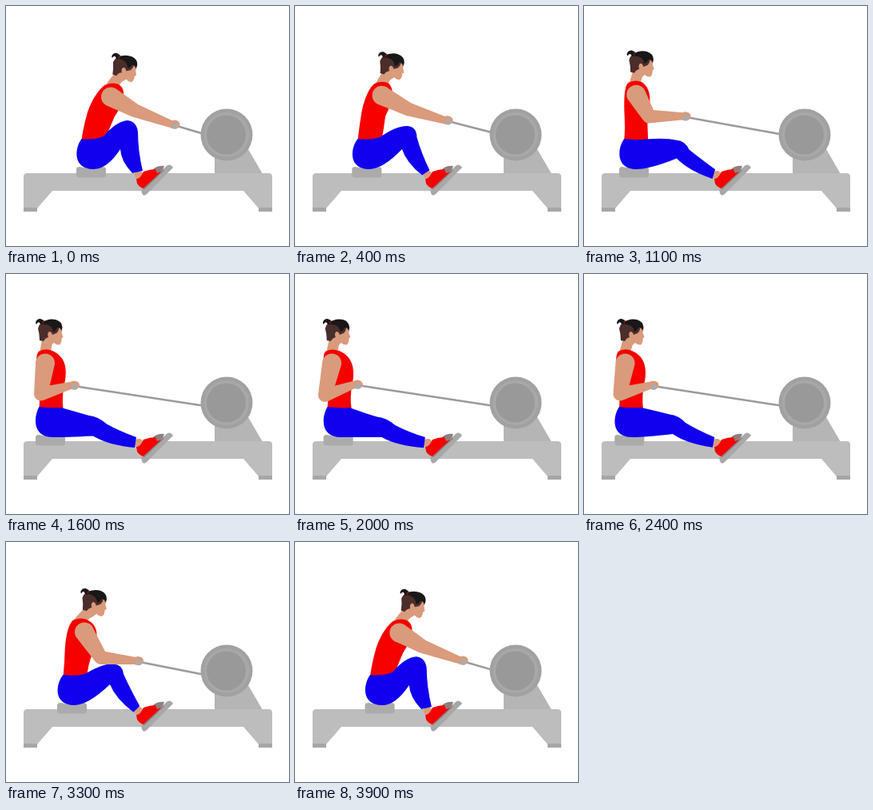
These frames come from a looping animation (354 px wide and 300 px high, 4000 ms). An HTML page:

```html
<!DOCTYPE html>
<html lang="en">
<head>
<meta charset="utf-8">
<title>Rowing machine</title>
<style>
html, body { margin: 0; width: 100%; height: 100%; overflow: hidden; background: #fff; }
svg { display: block; width: 354px; height: 300px; }
</style>
</head>
<body>
<svg viewBox="0 0 354 300" xmlns="http://www.w3.org/2000/svg">
  <path fill="#b5b5b5" d="M261 179H303L321 210H261Z"/>
  <path fill="#bdbdbd" d="M22 253V213Q22 209 27 209H328Q333 209 333 213V253H316L297 231H58L39 253Z"/>
  <path fill="#a6a6a6" d="M22 252H39V257H22ZM316 252H333V257H316Z"/>
  <path id="rope" stroke="#9b9b9b" stroke-width="2.5"/>
  <circle cx="276" cy="161" r="32.5" fill="#a1a1a1"/>
  <circle cx="276" cy="161" r="28" fill="#a8a8a8"/>
  <circle cx="275.5" cy="161" r="24.5" fill="#999"/>

  <path id="seat" fill="#ababab" d="M0 204Q0 201 4 201Q18.500 204 33 201Q37 201 37 204V211Q37 214.500 33 214.500H4Q0 214.500 0 211Z"/>
  <path fill="#a8a8a8" d="M169 229L202 199Q206 197 209 202L176 235Q172 239 170 234Z"/>
  <ellipse cx="166" cy="211" rx="5.500" ry="5" fill="#d99b7c"/>
  <path fill="#8d8080" d="M184 204Q190 199 198 200L196 205L188 210Z"/>
  <path fill="#f60000" d="M163 216Q168 216 172 207Q180 204 187 204L189 209L195 206L190 212L172 228Q167 227 164 222Z"/>
  <path fill="none" stroke="#858585" stroke-width="1.500" d="M172 229L197.500 205"/>

  <path id="neck" stroke="#d99b7c" stroke-width="13.500" stroke-linecap="round"/>
  <path id="vest" fill="#f60000"/>
  <path id="leg" fill="#1000ee"/>
  <g id="head">
    <path fill="#d99b7c" d="M-9 0L13 -8Q15 -3 13.500 1L15.500 7L13.500 8.500Q14 14 11 16.500Q7 17 4 14L-3 20L-12 9Z"/>
    <path fill="#4a2e2b" d="M-16 -4Q-14 -13 -4 -13L11 -8Q10 0 7 2L2 4Q1 0 -2 0Q-5 2 -3 7Q-7 8 -9 12L-14 11Q-14 3 -16 -4Z"/>
    <path fill="#191717" d="M-12 -11Q-3 -17 6 -15Q14 -13 14.500 -5L13.500 -1Q11 -6 8 -5Q6 0 3 0Q2 -6 -3 -8Q-8 -9 -12 -11Z"/>
    <path fill="#191717" d="M-19 -11Q-18 -16 -13 -16Q-9 -15 -7 -12L-9 -9Q-13 -8 -14 -11Q-16 -13 -18 -9Z"/>
    <path stroke="#9c1c1c" stroke-width="1.200" d="M-9 -14L-10 -10"/>
  </g>
  <path id="arm" fill="#d99b7c"/>
  <ellipse id="fist" rx="7" ry="5.500" fill="#d99b7c"/>
  <circle id="grip" r="3.700" fill="#ababab"/>
</svg>
<script>
const LOOP = 4000, STEP = 100;
const times = [0, 700, 1600, 2400, 2800, 3300, 3900];

// One value per key time; the last one, just short of the catch, is derived.
const tracks = {
  seat:   [88, 55, 37, 38.3, 44.5, 64],
  hipX:   [109, 77, 56, 58.5, 65, 86],
  neckX:  [132, 83, 49, 51, 64, 92],
  neckY:  [98, 95, 96, 96, 96, 97],
  chest:  [21, 16, 24, 24, 24, 24],
  headX:  [149, 94.3, 56, 60, 74, 111],
  headY:  [77, 72.5, 72, 72, 72, 75.3],
  tilt:   [10, 3, 0, 0, 0, 6],
  armX:   [131, 85.5, 49, 51.5, 65.5, 98],
  elbowX: [161, 117, 43.5, 45, 63, 118.5],
  elbowY: [130.5, 129.5, 150, 150, 147.5, 144.5],
  handX:  [210.5, 165.5, 85, 86.5, 109, 165],
  handY:  [148, 138.5, 139, 139, 144.5, 148.5],
  ropeY:  [159.5, 157.5, 164.5, 164.5, 166.5, 165.5],
  kneeX:  [152, 129, 104, 107, 117, 135],
  kneeY:  [143, 158, 177, 175.5, 167, 152.5],
  shinX:  [165, 140, 126, 127, 130, 147],
  shinY:  [157, 171, 187.5, 186, 178, 165],
  bendX:  [143, 124.5, 109, 111, 115, 130],
  bendY:  [179, 181, 202.5, 200, 189.5, 178]
};
for (const v of Object.values(tracks)) v.push(v[0] + 0.02 * (v[5] - v[0]));

const count = times.length;
const keyTime = i => times[(i + count) % count] + LOOP * Math.floor(i / count);

// Cyclic cubic through the keys, slopes weighted by interval length.
function sample(v, t) {
  const val = i => v[(i + count) % count];
  const gap = i => keyTime(i + 1) - keyTime(i);
  const rate = i => (val(i + 1) - val(i)) / gap(i);
  const slope = i => (gap(i) * rate(i - 1) + gap(i - 1) * rate(i)) / (gap(i - 1) + gap(i));
  let i = count - 1;
  while (t < times[i]) i--;
  const h = gap(i), u = (t - times[i]) / h, w = 1 - u;
  return val(i) * w * w * (1 + 2 * u) + val(i + 1) * u * u * (3 - 2 * u)
    + h * u * w * (slope(i) * w - slope(i + 1) * u);
}

const el = id => document.getElementById(id);
const set = (id, attrs) => {
  for (const k in attrs) el(id).setAttribute(k, attrs[k]);
};

const disc = (x, y, r) => `M${x - r} ${y}a${r} ${r} 0 1 1 ${2 * r} 0a${r} ${r} 0 1 1 ${-2 * r} 0Z`;

// Tapered limb segment with a round start.
function limb(x0, y0, r0, x1, y1, r1) {
  const d = Math.hypot(x1 - x0, y1 - y0), nx = (y1 - y0) / d, ny = (x0 - x1) / d;
  return disc(x0, y0, r0) +
    `M${x0 + nx * r0} ${y0 + ny * r0}L${x1 + nx * r1} ${y1 + ny * r1}` +
    `L${x1 - nx * r1} ${y1 - ny * r1}L${x0 - nx * r0} ${y0 - ny * r0}Z`;
}

function vestPath(p) {
  const hipY = 168, lean = p.neckX - p.hipX, back = -13 - 0.2 * lean;
  const at = (u, v) => `${p.hipX + u + v * lean} ${hipY + v * (p.neckY - hipY)} `;
  return `M${at(-8, 0.99)}C${at(-13, 0.93)}${at(back - 1, 0.75)}${at(back - 1, 0.5)}` +
    `Q${at(back, 0.2)}${at(-14.5, 0)}L${at(15.5, 0)}Q${at(15, 0.2)}${at(p.chest - 4, 0.42)}` +
    `C${at(p.chest + 2, 0.68)}${at(p.chest + 1, 0.9)}${at(9, 1)}Q${at(1, 1.05)}${at(-8, 0.99)}Z`;
}

function legPath(p) {
  const s = (p.seat - 37) / 51, mid = p.seat + 18.5;
  const heelX = 161 - 3 * s, heelY = 217 - 8 * s;
  const dx = heelX - p.bendX, dy = heelY - p.bendY, d = Math.hypot(dx, dy);
  const calfX = p.bendX + 0.4 * dx - 6 * dy / d, calfY = p.bendY + 0.4 * dy + 6 * dx / d;
  const backX = p.hipX - 14.5;
  return `M${backX} 166C${mid - 21} 178 ${mid - 23} 204 ${mid + 3} 204` +
    `Q${mid + 20} 204 ${p.bendX} ${p.bendY}` +
    `Q${calfX} ${calfY} ${heelX} ${heelY}L${163 + 8 * s} ${204 + 2 * s}` +
    `Q${p.shinX + 16 - 16 * s} ${p.shinY + 9 + 15 * s} ${p.shinX} ${p.shinY}` +
    `Q${p.kneeX + 11} ${p.kneeY + 1} ${p.kneeX} ${p.kneeY}` +
    `Q${p.kneeX - 14} ${p.kneeY - 4 + 5 * s} ${p.hipX + 13} ${167 - 4 * s}` +
    `Q${p.hipX} 168 ${backX} 166Z`;
}

function draw(t) {
  const p = {};
  for (const k in tracks) p[k] = sample(tracks[k], t);
  const a = p.tilt * Math.PI / 180, c = Math.cos(a), n = Math.sin(a);
  const napeX = p.headX - 4 * c - 9 * n, napeY = p.headY - 4 * n + 9 * c;

  set("seat", { transform: `translate(${p.seat} 0)` });
  set("rope", { d: `M${p.handX} ${p.handY + 1}L246 ${p.ropeY}` });
  set("neck", { d: `M${napeX} ${napeY}L${p.neckX} ${p.neckY + 2}` });
  set("vest", { d: vestPath(p) });
  set("leg", { d: legPath(p) });
  set("head", { transform: `translate(${p.headX} ${p.headY}) rotate(${p.tilt})` });
  set("arm", {
    d: limb(p.armX, p.neckY + 15.5, 12, p.elbowX, p.elbowY, 8.5) +
       limb(p.elbowX, p.elbowY, 8.5, p.handX - 3, p.handY, 4.5)
  });
  set("fist", { cx: p.handX, cy: p.handY });
  set("grip", { cx: p.handX + 1, cy: p.handY + 2 });
}

const start = performance.now();
function tick(now) {
  const t = Math.max(0, now - start) % LOOP;
  draw(Math.floor(t / STEP) * STEP);
  requestAnimationFrame(tick);
}
draw(0);
requestAnimationFrame(tick);
</script>
</body>
</html>
```
